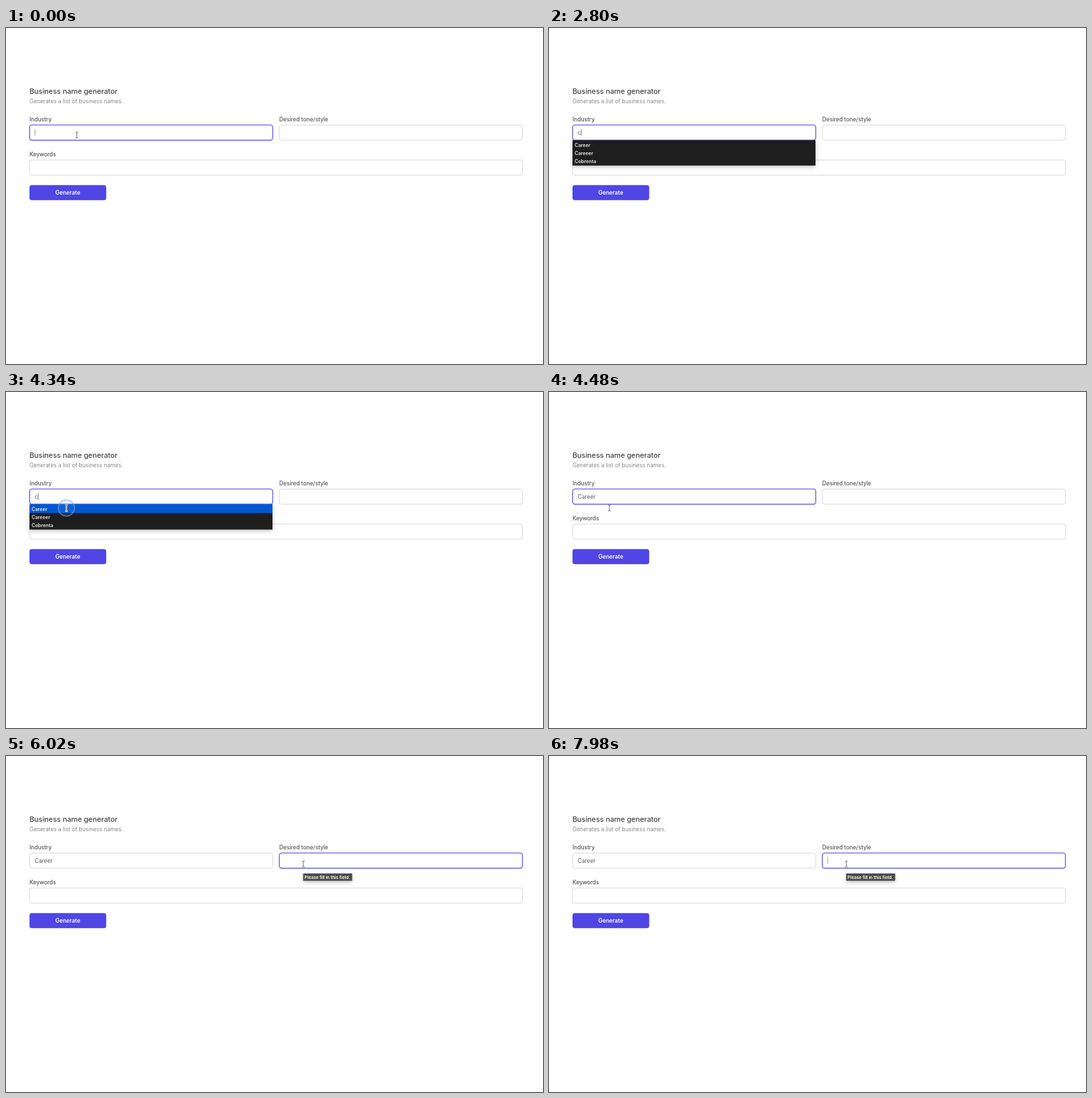
An HTML page for the animation above (8000 ms loop, 800 by 500 pixels).

```html
<!DOCTYPE html>
<html lang="en">
<head>
<meta charset="utf-8">
<title>Business name generator</title>
<style>
  html, body { margin: 0; width: 100%; height: 100%; overflow: hidden; background: #fff; }
  svg { display: block; width: 800px; height: 500px; }
  text { font: 500 8.35px Inter, "Open Sans", sans-serif; fill: #555558; }
  .title { font-size: 10.8px; fill: #444447; }
  .note { font-size: 8.3px; font-weight: 400; fill: #88888c; }
  .value { font-weight: 400; fill: #5c5c60; }
  .button { font-weight: 600; fill: #fff; }
  #menu text { font-size: 7.2px; font-weight: 600; fill: #e8e8e8; }
  #tip text { font-size: 6.45px; font-weight: 600; fill: #fff; }
  .field { fill: #fff; stroke: #d9d9dc; stroke-width: 1; }
  .field.focus { stroke: #6c64e8; stroke-width: 1.4; }
  #menu, #tip { filter: drop-shadow(0 2px 3px rgba(0, 0, 0, .25)); }
</style>
</head>
<body>
<svg viewBox="0 0 800 500">
  <text class="title" x="35" y="97.6">Business name generator</text>
  <text class="note" x="35" y="112.3">Generates a list of business names.</text>
  <text x="35" y="139">Industry</text>
  <text x="407" y="139">Desired tone/style</text>
  <text x="35" y="191">Keywords</text>
  <rect id="industry" class="field" x="35.2" y="144.4" width="362.2" height="22.6" rx="3.5"/>
  <rect id="tone" class="field" x="407.2" y="144.4" width="362.2" height="22.6" rx="3.5"/>
  <rect class="field" x="35.2" y="196.4" width="734.2" height="22.6" rx="3.5"/>
  <rect x="35" y="233.8" width="114.3" height="22.5" rx="3.5" fill="#4f46e5"/>
  <text class="button" x="92.1" y="248.2" text-anchor="middle">Generate</text>
  <text id="typed" class="value" x="42.8" y="159"></text>
  <rect id="caret" y="150.8" width=".9" height="9.6" fill="#66666a"/>
  <g id="menu">
    <rect x="35" y="167" width="362" height="37.7" fill="#1e1e1e"/>
    <rect id="hover" x="35" y="167" width="362" height="13" fill="#0058d0"/>
    <text x="38.2" y="176.6">Career</text>
    <text x="38.2" y="188.6">Careeer</text>
    <text x="38.2" y="200.6">Cobrenta</text>
  </g>
  <g id="tip">
    <rect x="442.7" y="174.8" width="73" height="10.9" fill="#4b4b4d"/>
    <text x="444.8" y="182.7">Please fill in this field.</text>
  </g>
  <g id="pointer" fill="none">
    <circle id="ring" r="12" fill="#78aaf0" fill-opacity=".12" stroke="#78a8f0" stroke-opacity=".6" stroke-width="1.8"/>
    <path id="halo" d="M-2-4.5Q0-4.5 0-3.3Q0-4.5 2-4.5M0-3.5V3.5M-2 4.5Q0 4.5 0 3.3Q0 4.5 2 4.5" stroke="#fff" stroke-width="2.2"/>
    <path id="beam" d="M-2-4.5Q0-4.5 0-3.3Q0-4.5 2-4.5M0-3.5V3.5M-2 4.5Q0 4.5 0 3.3Q0 4.5 2 4.5" stroke="#626266" stroke-width=".9"/>
  </g>
</svg>
<script>
const LOOP = 8000;
const TYPE = 2590, PICK = 4480, FOCUS = 5250, TIP = 6020;
const $ = id => document.getElementById(id);
const show = (id, on) => $(id).setAttribute('visibility', on ? 'visible' : 'hidden');
const between = (t, a, b) => t >= a && t < b;

// Start and end of each caret fade; fades alternate between out and in.
const fades = [
  [-50, 130], [210, 370], [990, 1170], [1240, 1400], [2030, 2240], [2589, 2590],
  [3010, 3120], [3170, 3290], [3780, 3960], [4130, 4300], [4479, 4480], [5249, 5250],
  [5390, 5530], [6270, 6440], [6870, 7070], [7350, 7500], [7930, 8110]
];

function caretAlpha(t) {
  let alpha = 1;
  fades.forEach(([a, b], i) => {
    const k = Math.min(1, Math.max(0, (t - a) / (b - a)));
    if (t >= a) alpha = i % 2 ? k : 1 - k;
  });
  return alpha;
}

function glide(t, a, b, from, to) {
  const k = Math.min(1, Math.max(0, (t - a) / (b - a)));
  const e = k * k * (3 - 2 * k);
  return from.map((v, i) => v + (to[i] - v) * e);
}

function pointerAt(t) {
  if (t < 4600) return glide(t, 3780, 4130, [105.6, 159.2], [90, 172.6]);
  return glide(t, 4600, 4990, [90, 172.6], [443, 160.8]);
}

function draw(t) {
  const menu = between(t, TYPE, PICK);
  const [x, y] = pointerAt(t);
  const hover = menu && y > 167;

  $('typed').textContent = t < TYPE ? '' : t < PICK ? 'c' : 'Career';
  $('industry').classList.toggle('focus', t < FOCUS);
  $('tone').classList.toggle('focus', t >= FOCUS);
  $('caret').setAttribute('x', t < TYPE ? 42.7 : t < FOCUS ? 47.6 : 414.7);
  $('caret').setAttribute('opacity', between(t, PICK, FOCUS) ? 0 : caretAlpha(t));

  show('menu', menu);
  show('hover', hover);
  show('tip', t >= TIP);
  $('pointer').setAttribute('transform', `translate(${x} ${y})`);
  const moving = !between(t, TYPE, 3780);
  show('beam', moving);
  show('halo', moving && hover);
  show('ring', between(t, 4270, PICK) || between(t, 5180, 5390));
}

function tick(now) {
  draw(now % LOOP);
  requestAnimationFrame(tick);
}
draw(0);
requestAnimationFrame(tick);
</script>
</body>
</html>
```
